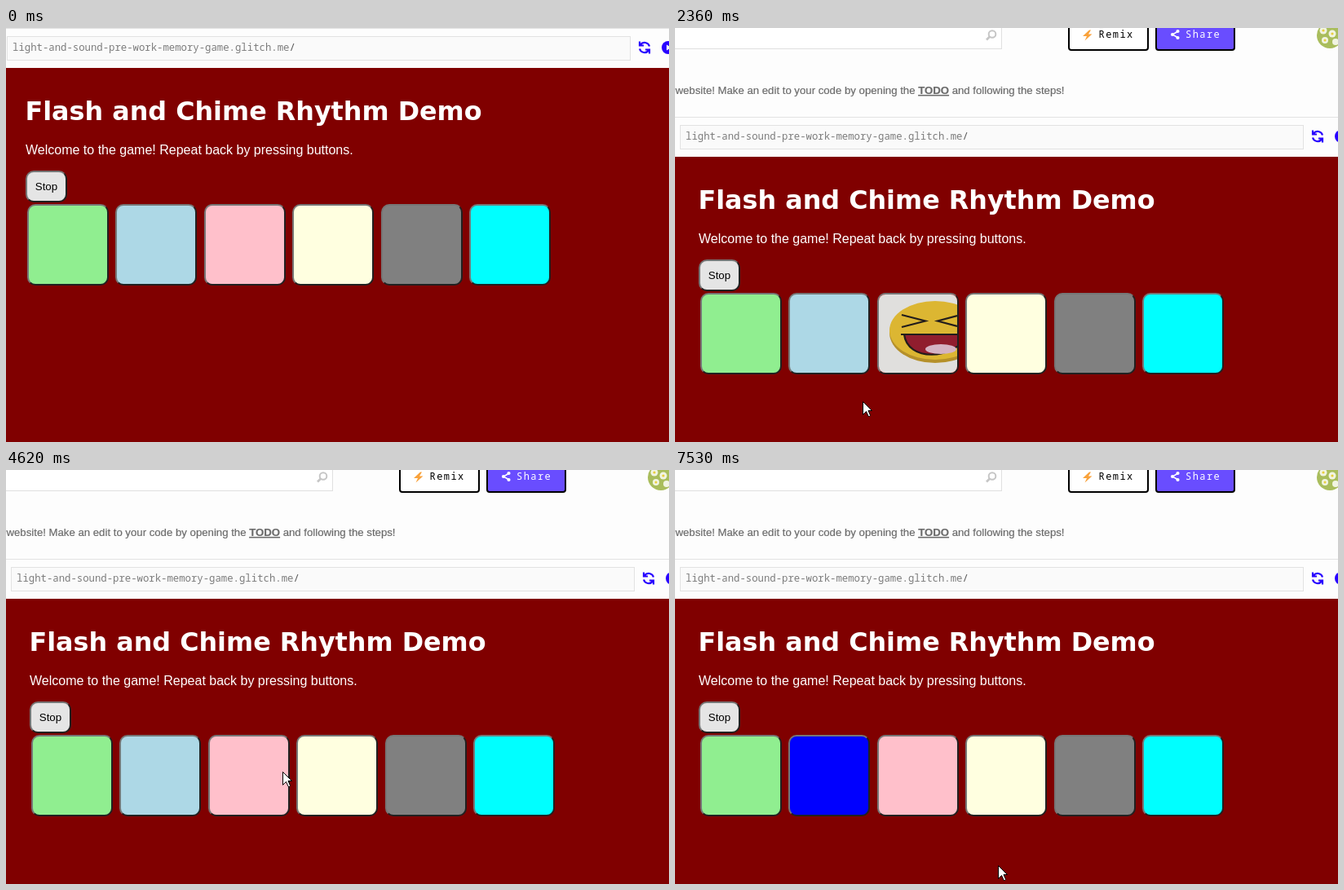
Animation, 813 px wide and 508 px high, one loop 8000 ms. Source, as an HTML page:

```html
<!DOCTYPE html>
<html lang="en">
<head>
<meta charset="utf-8">
<title>Flash and Chime Rhythm Demo</title>
<style>
  html, body { margin: 0; width: 100%; height: 100%; overflow: hidden; background: #800000; }
  .stage { position: relative; width: 813px; height: 508px; overflow: hidden; background: #800000; }
  .page, .cursor, .page > * { position: absolute; }
  .page { inset: 0; }
  .chrome { left: 0; top: 0; }
  .cursor { left: 0; top: 0; }
  .page, .cursor, .blue, .pink, .yellow, .face { animation: 8s step-end infinite; }

  .btn {
    --hi: #767676; --lo: #212121;
    box-sizing: border-box; border: 2px solid; border-radius: 10px;
    border-color: var(--hi) var(--lo) var(--lo) var(--hi);
  }
  .pad { top: 325px; width: 100px; height: 100px; overflow: hidden; }
  .stop {
    left: 29px; top: 284px; width: 51px; height: 39px; background: #e5e5e5;
    font: 13.333px/35px "Liberation Sans", Arial, sans-serif; text-align: center; color: #000;
  }
  .green { left: 31px; background: #90ee90; }
  .blue { left: 139px; background: #add8e6; animation-name: blue; }
  .pink { left: 248px; background: #ffc0cb; animation-name: pink; }
  .yellow { left: 356px; background: #ffffe0; animation-name: yellow; }
  .grey { left: 465px; background: #808080; }
  .cyan { left: 573px; background: #00ffff; }
  .face { display: block; opacity: 0; animation-name: face; }
  .page { animation-name: scroll; }
  .cursor { animation-name: point; }

  .sans { font-family: "Liberation Sans", Arial, sans-serif; }
  .mono { font-family: "Noto Sans Mono", "DejaVu Sans Mono", monospace; }
  .title { font: bold 31.8px "DejaVu Sans", Verdana, sans-serif; }
  .todo { font-weight: bold; text-decoration: underline; }

  @keyframes scroll {
    0% { transform: translate(-5px, -109px); }
    12.5%, 100% { transform: none; }
  }
  @keyframes yellow {
    12.5% { background: #ff0; }
    14.125% { background: #ffffe0; }
    64.625% { background: #ff0; border-color: var(--lo) var(--hi) var(--hi) var(--lo); }
    0%, 68.125%, 100% { background: #ffffe0; border-color: var(--hi) var(--lo) var(--lo) var(--hi); }
  }
  @keyframes blue {
    39.125%, 49% { background: #00f; border-color: var(--lo) var(--hi) var(--hi) var(--lo); }
    0%, 45.625%, 54.25% { background: #add8e6; border-color: var(--hi) var(--lo) var(--lo) var(--hi); }
    94.125%, 100% { background: #00f; border-color: var(--hi) var(--lo) var(--lo) var(--hi); }
  }
  @keyframes pink {
    17.25% { background: #f00; }
    31.125% { background: #ffc0cb; }
    76.875% { background: #f00; border-color: var(--lo) var(--hi) var(--hi) var(--lo); }
    0%, 82.5%, 100% { background: #ffc0cb; border-color: var(--hi) var(--lo) var(--lo) var(--hi); }
  }
  @keyframes face {
    0%, 31.125%, 82.5%, 100% { opacity: 0; }
    19%, 76.875% { opacity: 1; }
  }
  @keyframes point {
    0% { transform: translate(-50px, -50px); }
    12.5% { transform: translate(283px, 466px); }
    24.125% { transform: translate(272px, 460px); }
    26% { transform: translate(249px, 455px); }
    27.75% { transform: translate(240px, 459px); }
    29.5% { transform: translate(230px, 458px); }
    31.125% { transform: translate(222px, 440px); }
    32.625% { transform: translate(212px, 410px); }
    34.25% { transform: translate(206px, 390px); }
    35.75% { transform: translate(205px, 381px); }
    57.75% { transform: translate(339px, 370px); }
    59.75% { transform: translate(402px, 359px); }
    61.25% { transform: translate(412px, 357px); }
    71.625% { transform: translate(335px, 372px); }
    73.375% { transform: translate(310px, 375px); }
    85.875% { transform: translate(330px, 405px); }
    87.375% { transform: translate(380px, 465px); }
    88.875%, 100% { transform: translate(396px, 485px); }
  }
</style>
</head>
<body>
<div class="stage">
  <div class="page">
    <svg class="chrome" width="860" height="280">
      <rect width="860" height="158" fill="#fdfdfd"/>

      <!-- search field -->
      <rect x="-9.5" y="-19.5" width="410" height="45" fill="#fff" stroke="#e0e0e0"/>
      <g fill="none" stroke="#c6c6c6" stroke-width="2">
        <circle cx="389" cy="7.5" r="4.3"/>
        <path d="M386 10.5L382 14.5" stroke-width="2.6"/>
      </g>

      <!-- top buttons -->
      <g stroke="#000" stroke-width="2">
        <rect x="483" y="-19" width="97" height="46" rx="3" fill="#fff"/>
        <rect x="590" y="-19" width="96" height="46" rx="3" fill="#694dff"/>
      </g>
      <path d="M508 2.500L500 10H505L502.500 15.500L511.500 7.500H507L510 2.500Z" fill="#f9a23b"/>
      <g class="mono" font-size="12" letter-spacing="1.45">
        <text x="519.5" y="12">Remix</text>
        <text x="626" y="12" fill="#fff" font-weight="500">Share</text>
      </g>
      <g fill="#fff">
        <path d="M617 4L610 8L617 12" fill="none" stroke="#fff" stroke-width="1.5"/>
        <circle cx="616.5" cy="4" r="2.1"/>
        <circle cx="610" cy="8" r="2.1"/>
        <circle cx="616.5" cy="12" r="2.1"/>
      </g>

      <!-- avatar -->
      <circle cx="803" cy="9" r="16" fill="#a9bd5c"/>
      <g fill="#f1f4e2">
        <circle cx="795" cy="3" r="4.5"/>
        <circle cx="806" cy="7" r="4.5"/>
        <circle cx="797" cy="15" r="4"/>
        <circle cx="810" cy="17" r="4"/>
      </g>
      <g fill="#e8cf3c">
        <circle cx="795" cy="3" r="1.6"/>
        <circle cx="806" cy="7" r="1.6"/>
        <circle cx="797" cy="15" r="1.5"/>
      </g>

      <text class="sans" x="0.5" y="81" font-size="13.2" fill="#6b6b6b" stroke="#6b6b6b" stroke-width=".2">website! Make an edit to your code by opening the <tspan class="todo">TODO</tspan> and following the steps!</text>

      <!-- address bar -->
      <path d="M0 109.5H860" stroke="#e2e2e2"/>
      <rect x="6.5" y="119.5" width="764" height="29" fill="#fafafa" stroke="#e2e2e2"/>
      <text class="mono" x="13" y="137" font-size="12.3" fill="#7c7c7c">light-and-sound-pre-work-memory-game.glitch.me<tspan fill="#555">/</tspan></text>
      <g fill="none" stroke="#2800ff" stroke-width="2.2">
        <path id="turn" d="M794 131.5A6.2 6.2 0 0 0 783 129.5M782 125.5V130.5H787"/>
        <use href="#turn" transform="rotate(180 788 133)"/>
      </g>
      <circle cx="817" cy="133" r="8" fill="#2800ff"/>
      <path d="M815 129.5V136.5L821 133Z" fill="#fff"/>

      <!-- game text -->
      <rect y="158" width="860" height="122" fill="#800000"/>
      <g fill="#fff">
        <text class="title" x="28.5" y="222">Flash and Chime Rhythm Demo</text>
        <text class="sans" x="29" y="263.5" font-size="16">Welcome to the game! Repeat back by pressing buttons.</text>
      </g>
    </svg>

    <div class="btn stop">Stop</div>
    <div class="btn pad green"></div>
    <div class="btn pad blue"></div>
    <div class="btn pad pink">
      <svg class="face" width="96" height="96">
        <rect width="96" height="96" fill="#e0dfdd"/>
        <ellipse cx="69" cy="47" rx="56" ry="37" fill="#b5902a"/>
        <ellipse cx="69" cy="44" rx="56" ry="36" fill="#dcb632"/>
        <g stroke="#221d1c" stroke-width="2.2" fill="none">
          <path d="M28 25L57 32.5L28 40M96 26L72 32.5L96 39"/>
          <path d="M31 49C35 82 90 82 110 49Z" fill="#901d2e"/>
          <path d="M27 49H96"/>
        </g>
        <ellipse cx="76" cy="67" rx="19" ry="6" fill="#d4b3c4"/>
      </svg>
    </div>
    <div class="btn pad yellow"></div>
    <div class="btn pad grey"></div>
    <div class="btn pad cyan"></div>
  </div>

  <svg class="cursor" width="13" height="20">
    <path d="M.5 .5V16.5L4.5 12.5L7.2 18.5H8.5L9.5 17.3L7 11.5H11.5Z" fill="#fff" stroke="#000" stroke-linejoin="round"/>
  </svg>
</div>
</body>
</html>
```
